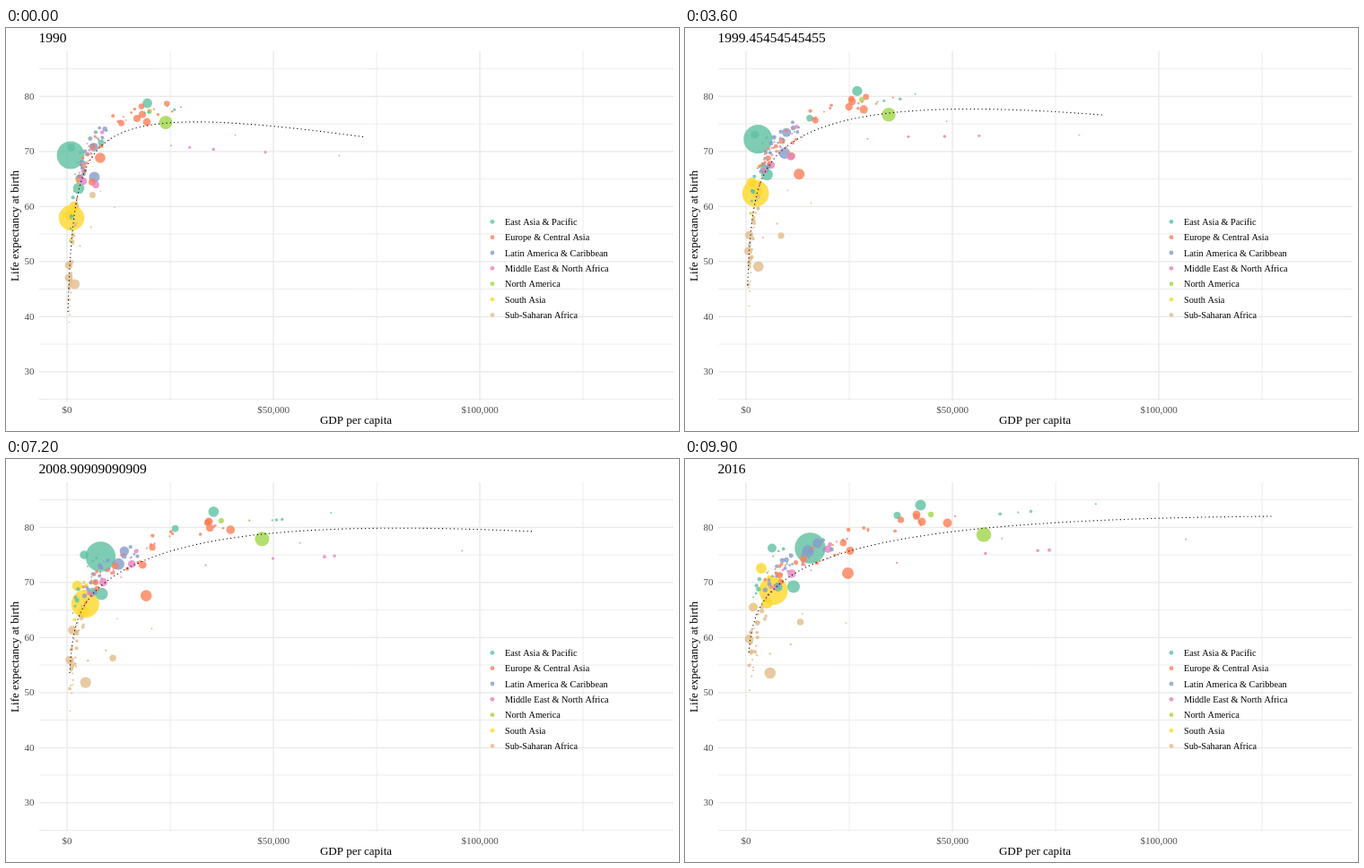
These frames come from a looping animation (750 px wide and 450 px high, 10000 ms). An HTML page with a canvas:

```html
<!DOCTYPE html>
<html lang="en">
<head>
<meta charset="utf-8">
<style>
html, body { margin: 0; width: 100%; height: 100%; overflow: hidden; background: #fff }
canvas { display: block }
</style>
</head>
<body>
<canvas id="stage" width="750" height="450"></canvas>
<script>
const ctx = document.getElementById('stage').getContext('2d');
const STEPS = 100, STEP_MS = 100, ZERO_X = 68;
const regions = [
  ['East Asia & Pacific', '#5fc0a2'],
  ['Europe & Central Asia', '#fb7f59'],
  ['Latin America & Caribbean', '#879bc9'],
  ['Middle East & North Africa', '#e582bf'],
  ['North America', '#a0d649'],
  ['South Asia', '#ffd728'],
  ['Sub-Saharan Africa', '#e1bd89']
];
const [EAP, ECA, LAC, MENA, NAM, SAS, SSA] = regions.keys();

const mix = (a, b, k) => a + (b - a) * k;
const grow = (a, b, k) => a * (b / a) ** k;
// Growth runs slightly ahead early on and slows towards the end
const pace = t => t + .24 * t * (1 - t);

let seed = 11;
const rand = () => (seed = seed * 16807 % 2147483647) / 2147483647;

// ---- trend: step, left end, right end, heights at even log-income intervals ----
const trendKeys = [
  [0, 69, 398, 317, 195, 133, 106, 121.5],
  [45, 70, 482, 280, 185, 136, 97.5, 91],
  [72, 71, 588, 239, 174, 133, 92, 81],
  [88, 72, 712, 227, 172, 131, 87.5, 69.5],
  [99, 71, 654, 216, 168, 129, 89, 64]
];

function trendAt(step) {
  const next = Math.max(1, trendKeys.findIndex(key => key[0] >= step));
  const a = trendKeys[next - 1], b = trendKeys[next];
  const k = (step - a[0]) / (b[0] - a[0]);
  const [, left, right, ...heights] = a.map((v, i) => mix(v, b[i], k));
  return { left, right, heights };
}

// Polynomial through the heights, over the logarithm of income
function trendY({ left, right, heights }, x) {
  const logIncome = d => Math.log(1 + Math.max(0, d) / 5);
  const u = Math.min(1, logIncome(x - left) / logIncome(right - left)) * (heights.length - 1);
  return heights.reduce((sum, h, i) =>
    sum + heights.reduce((term, _, j) => j === i ? term : term * (u - j) / (i - j), h), 0);
}

// ---- large bubbles: region, radius, income and height at start and end, mid-way setback ----
const large = [
  [EAP, 15.4, 4, 142, 71.5, 99.5],
  [SAS, 14.3, 5, 212, 30.5, 147],
  [NAM, 7.4, 110, 105.5, 265, 84.5],
  [EAP, 6.3, 13, 179, 53, 142.5],
  [LAC, 6, 30.5, 166.5, 69, 103],
  [ECA, 5.8, 37, 145, 113.5, 127.5, 28],
  [SSA, 5.6, 8.5, 286, 26.8, 239],
  [EAP, 5.4, 89.5, 84, 194.5, 51.5],
  [SAS, 5.4, 8, 199, 23.5, 161],
  [SAS, 5.3, 3, 209, 17, 122],
  [LAC, 4.8, 30, 133, 79.5, 94],
  [EAP, 4.5, 14, 168, 35.5, 143],
  [EAP, 4.4, 4.5, 133.5, 29, 99.5],
  [ECA, 4.4, 89, 105, 224.5, 71.5],
  [SSA, 4.4, 2, 279, 8, 165.5],
  [SSA, 4.4, 2, 265, 3.5, 201, 12],
  [MENA, 4.2, 18, 171, 51, 128],
  [ECA, 4, 84, 96.5, 190, 62],
  [ECA, 4, 78, 101, 196, 70],
  [ECA, 4, 28, 172, 116, 102.5],
  [MENA, 3.9, 32, 175, 91.5, 100.5],
  [EAP, 3.5, 38, 128, 168.5, 63],
  [SSA, 3.4, 28.5, 186.5, 60.5, 182, 52],
  [NAM, 2.8, 92, 93, 206, 62]
].map(([region, r, x0, y0, x1, y1, setback = 0]) => ({
  region, r,
  place(t) {
    return [ZERO_X + grow(x0, x1, pace(t)), mix(y0, y1, pace(t)) + setback * Math.sin(Math.PI * t)];
  }
}));

// ---- small bubbles: scattered around the trend and carried along by it ----
function scatter(region, count, rMax, poorest, richest, growth, lift, spread) {
  return Array.from({ length: count }, (_, i) => {
    const x0 = grow(poorest, richest, (i + rand()) / count);
    const x1 = x0 * growth * Math.exp((rand() - .5) * .5);
    const off = lift + (rand() - .5) * spread;
    return {
      region,
      r: mix(.9, rMax, rand() ** 2),
      place(t, trend) {
        const x = ZERO_X + grow(x0, x1, pace(t));
        return [x, trendY(trend, x) + off];
      }
    };
  });
}
const small = [
  scatter(EAP, 10, 3, 3, 18, 2.8, -26, 24),
  scatter(EAP, 4, 2, 80, 125, 3, -18, 8),
  scatter(ECA, 14, 3.4, 50, 128, 1.85, -17, 14),
  scatter(ECA, 24, 3.4, 10, 40, 2.4, -10, 26),
  scatter(LAC, 25, 2.8, 13, 45, 1.9, -12, 26),
  scatter(MENA, 10, 3, 14, 60, 2, -3, 26),
  scatter(MENA, 6, 2.4, 105, 320, 1.8, 22, 18),
  scatter(SAS, 4, 2.5, 3, 12, 2.8, -18, 20),
  scatter(SSA, 36, 2.8, 2, 11, 1.9, 22, 60),
  scatter(SSA, 4, 1.3, 14, 60, 2, 62, 50)
].flat();
const bubbles = [...large, ...small].sort((a, b) => b.r - a.r);

// ---- drawing ----
function text(str, x, y, size, color = '#000', align = 'left') {
  ctx.font = `${size}px "Liberation Serif", serif`;
  ctx.fillStyle = color;
  ctx.textAlign = align;
  ctx.fillText(str, x, y);
}

function dot(x, y, r, region) {
  ctx.globalAlpha = .8;
  ctx.fillStyle = regions[region][1];
  ctx.beginPath();
  ctx.arc(x, y, r, 0, 7);
  ctx.fill();
  ctx.globalAlpha = 1;
}

function line(x0, y0, x1, y1, width) {
  ctx.lineWidth = width;
  ctx.beginPath();
  ctx.moveTo(x0, y0);
  ctx.lineTo(x1, y1);
  ctx.stroke();
}

function drawAxes() {
  ctx.strokeStyle = '#e8e8e8';
  for (let age = 25; age <= 85; age += 5) {
    const y = 76.3 + (80 - age) * 6.15, major = age % 10 === 0;
    line(37, y, 744, y, major ? 1.3 : .8);
    if (major) text(age, 31.5, y + 3.6, 11, '#4d4d4d', 'right');
  }
  ['$0', '', '$50,000', '', '$100,000', ''].forEach((label, i) => {
    const x = ZERO_X + i * 115;
    line(x, 26, x, 416, label ? 1.3 : .8);
    text(label, x, 429.5, 11, '#4d4d4d', 'center');
  });
  text('GDP per capita', 390, 442, 13, '#000', 'center');
  ctx.save();
  ctx.translate(14, 221);
  ctx.rotate(-Math.PI / 2);
  text('Life expectancy at birth', 0, 0, 13, '#000', 'center');
  ctx.restore();
}

function drawTrend(trend) {
  const { left, right } = trend;
  ctx.strokeStyle = '#000';
  ctx.lineWidth = 1.1;
  ctx.setLineDash([1.1, 3.2]);
  ctx.beginPath();
  for (let k = 0; k <= 1; k += 1 / 128) {
    const x = mix(left, right, k * k);
    ctx.lineTo(x, trendY(trend, x));
  }
  ctx.stroke();
  ctx.setLineDash([]);
}

function drawLegend() {
  regions.forEach(([name], i) => {
    const y = 216.3 + i * 17.35;
    dot(542, y, 2.4, i);
    text(name, 556, y + 3.7, 10.25);
  });
}

function draw(step) {
  const t = step / (STEPS - 1), trend = trendAt(step);
  ctx.fillStyle = '#fff';
  ctx.fillRect(0, 0, 750, 450);
  drawAxes();
  for (const { region, r, place } of bubbles)
    dot(...place(t, trend), r * (1 + .12 * t), region);
  drawTrend(trend);
  drawLegend();
  const year = 1990 + 26 * step / (STEPS - 1);
  text(String(Number(year.toPrecision(15))), 36.5, 16, 15.5);
}

const start = performance.now();
function tick() {
  draw(Math.floor((performance.now() - start) / STEP_MS) % STEPS);
  requestAnimationFrame(tick);
}
tick();
</script>
</body>
</html>
```
